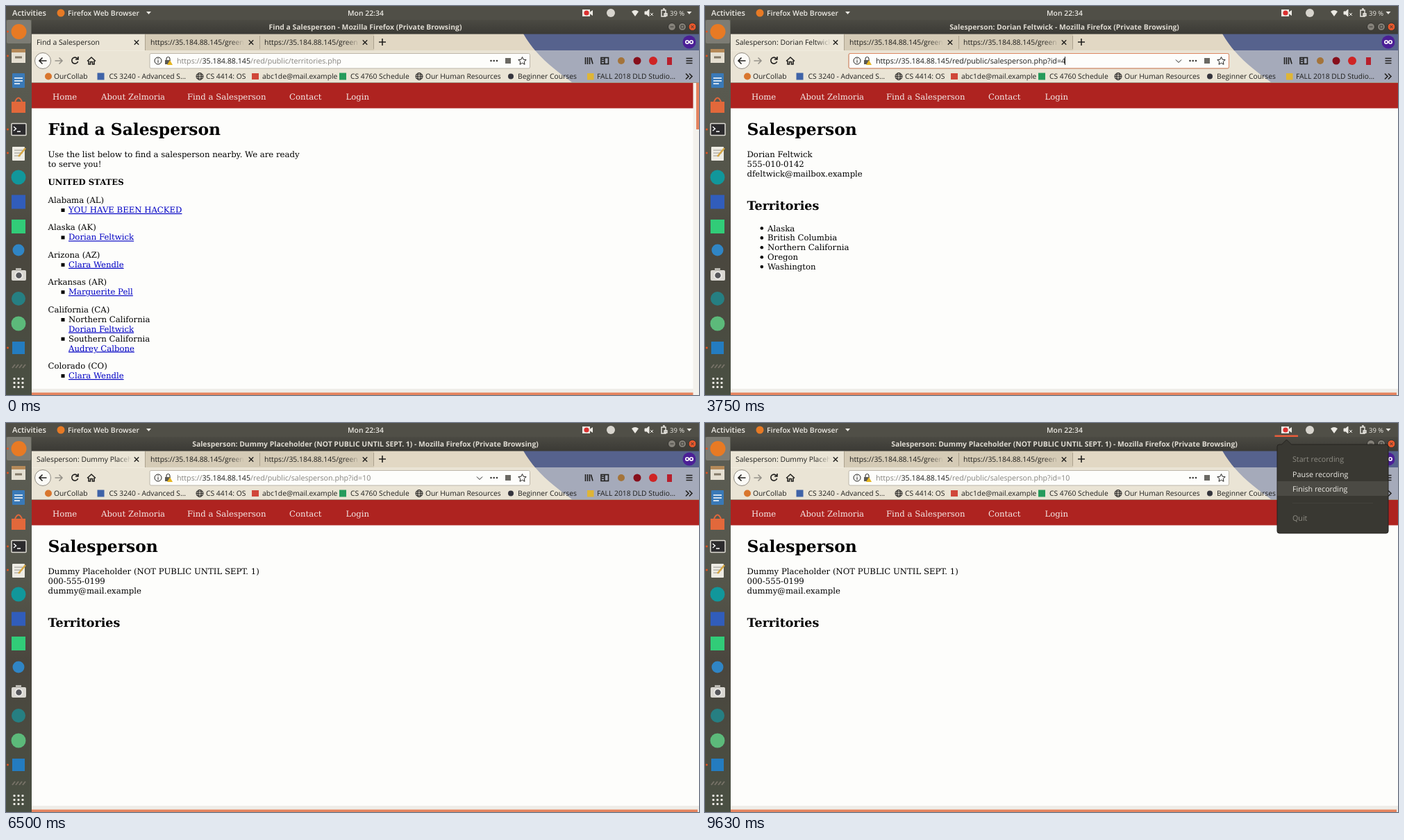
An HTML page that plays this animation: 998x561 px, repeating every 9760 ms.

```html
<!DOCTYPE html>
<html lang="en">
<head>
<meta charset="utf-8">
<title>Browser recording</title>
<style>
html, body { margin: 0; width: 100%; height: 100%; overflow: hidden; background: #fdfdfb; }
#stage { display: block; width: 998px; height: 561px; }
text { white-space: pre; text-rendering: geometricPrecision; }
.ui { font: 10.7px "Open Sans", "Noto Sans", sans-serif; fill: #1d1d1b; }
.panel { font-weight: 600; font-size: 10.4px; fill: #eceae4; }
.title { font-weight: 700; font-size: 10.4px; fill: #dfdbd2; text-anchor: middle; }
.tab { font-size: 10.4px; }
.mark { font-size: 10.3px; }
.grey { fill: #85837e; }
.host { fill: #1d1d1b; }
.page { font: 11.69px "DejaVu Serif", serif; fill: #000; }
.h1 { font-size: 23.4px; font-weight: 700; }
.h2 { font-size: 17.5px; font-weight: 700; }
.bold { font-weight: 700; }
.link { fill: #0000c4; text-decoration: underline; }
.nav { fill: #f4e8e6; }
.line { fill: none; stroke: #22211f; stroke-width: 1.6; }
.thin { stroke-width: 1; }
</style>
</head>
<body>
<svg id="stage" viewBox="0 0 998 561">
<defs>
  <linearGradient id="dock" x2="0" y2="1">
    <stop offset="0" stop-color="#5d5e55"/><stop offset=".4" stop-color="#54554a"/>
    <stop offset=".6" stop-color="#4a463e"/><stop offset="1" stop-color="#4a5043"/>
  </linearGradient>
  <linearGradient id="bar" x2="0" y2="1"><stop offset="0" stop-color="#4b4a43"/><stop offset="1" stop-color="#3b3a35"/></linearGradient>
  <linearGradient id="fadeOn"><stop offset="0" stop-color="#ebe5d6" stop-opacity="0"/><stop offset="1" stop-color="#ebe5d6"/></linearGradient>
  <linearGradient id="fadeOff"><stop offset="0" stop-color="#d5cbb6" stop-opacity="0"/><stop offset="1" stop-color="#d5cbb6"/></linearGradient>
  <linearGradient id="shade" x2="0" y2="1"><stop offset="0" stop-color="#000" stop-opacity=".22"/><stop offset="1" stop-color="#000" stop-opacity="0"/></linearGradient>
  <g id="globe" class="line thin"><circle r="5"/><ellipse rx="2.3" ry="5"/><path d="M-5 0H5M-4.3-2.5H4.3M-4.3 2.5H4.3"/></g>
  <path id="close" class="line thin" d="M-3.2-3.2 3.2 3.2M3.2-3.2-3.2 3.2" style="stroke-width:1.4"/>
</defs>

<!-- page -->
<rect width="998" height="561" fill="#fdfdfb"/>
<rect x="37" y="110" width="961" height="37.5" fill="#ae2320"/>
<g class="page nav">
  <text x="67" y="134.5">Home</text><text x="137" y="134.5">About Zelmoria</text>
  <text x="261" y="134.5">Find a Salesperson</text><text x="408" y="134.5">Contact</text><text x="489.5" y="134.5">Login</text>
</g>
<rect x="37" y="552" width="961" height="9" fill="#efede8"/>
<rect x="37" y="557.5" width="959" height="4" fill="#e5835e"/>

<g class="page" data-on="0-2500">
  <text class="h1" x="60.5" y="185.5">Find a Salesperson</text>
  <text x="60.5" y="218">Use the list below to find a salesperson nearby. We are ready</text>
  <text x="60.5" y="232">to serve you!</text>
  <text class="bold" x="60.5" y="258">UNITED STATES</text>
  <g id="territories"></g>
  <rect x="89.5" y="326.5" width="99" height="14" fill="none" stroke="#8a86a6" data-on="1880-2500"/>
  <rect x="989.5" y="110" width="8.5" height="451" fill="#f3f1ec"/>
  <rect x="994" y="111" width="4" height="67" fill="#e5835e"/>
</g>

<g class="page" data-on="2500-9760">
  <text class="h1" x="60.5" y="185.5">Salesperson</text>
  <text class="h2" x="60.5" y="294">Territories</text>
</g>
<g class="page" data-on="2500-6250">
  <text x="60.5" y="218">Dorian Feltwick</text>
  <text x="60.5" y="232">555-010-0142</text>
  <text x="60.5" y="246">dfeltwick@mailbox.example</text>
  <g id="regions"></g>
</g>
<g class="page" data-on="6250-9760">
  <text x="60.5" y="218">Dummy Placeholder (NOT PUBLIC UNTIL SEPT. 1)</text>
  <text x="60.5" y="232">000-555-0199</text>
  <text x="60.5" y="246">dummy@mail.example</text>
</g>

<!-- status bar -->
<g class="ui" data-on="880-2000">
  <rect x="36.5" y="545.5" width="279" height="17" rx="2" fill="#eceae1" stroke="#c2bfb4"/>
  <text x="40" y="557">https://35.184.88.145/red/public/salesperson.php?id=4</text>
</g>
<g class="ui" data-on="2000-2630 6000-6250">
  <rect x="36.5" y="545.5" width="236" height="17" rx="2" fill="#eceae1" stroke="#c2bfb4"/>
  <text x="40" y="557" fill="#4a4944">Waiting for 35.184.88.145…</text>
</g>

<!-- browser frame -->
<rect x="37" y="40" width="961" height="70.5" fill="#e2d8c4"/>
<path d="M745 40H998V110H815C795 95 765 75 745 40Z" fill="#56628d"/>
<rect x="200" y="40" width="330" height="24" fill="#d5cbb6"/>
<rect x="37" y="40" width="163" height="25" fill="#ebe5d6"/>
<rect x="37" y="64" width="961" height="46.5" fill="#f4f1e8" opacity=".5"/>
<path d="M200.5 41V64M365.5 43V62M529.5 43V62" stroke="#aca28e"/>
<path d="M37 110.5H998" stroke="#a39a88"/>

<g class="ui tab">
  <svg x="44" y="40" width="136" height="24">
    <text y="16" data-on="0-2000">Find a Salesperson</text>
    <text x="16" y="16" data-on="2000-2750 6000-6380">35.184.88.145/red/public</text>
    <text y="16" data-on="2750-6000">Salesperson: Dorian Feltwick</text>
    <text y="16" data-on="6380-9760">Salesperson: Dummy Placeholder</text>
  </svg>
  <rect x="160" y="42" width="21" height="20" fill="url(#fadeOn)"/>
  <svg x="208" y="40" width="134" height="24"><text y="16">https://35.184.88.145/green</text></svg>
  <rect x="322" y="42" width="21" height="20" fill="url(#fadeOff)"/>
  <svg x="372" y="40" width="136" height="24"><text y="16">https://35.184.88.145/green</text></svg>
  <rect x="488" y="42" width="21" height="20" fill="url(#fadeOff)"/>
</g>
<circle id="spinner" cy="52" r="1.5" fill="#55534d" data-on="2000-2750 6000-6380"/>
<use href="#close" x="188" y="52.5"/><use href="#close" x="353" y="52.5"/><use href="#close" x="517" y="52.5"/>
<path class="line" d="M537 52H547M542 47V57"/>
<circle cx="984" cy="52" r="9.5" fill="#4b1f96"/>
<g fill="none" stroke="#fff" stroke-width="1.6"><circle cx="981" cy="52" r="2.2"/><circle cx="987" cy="52" r="2.2"/></g>

<!-- toolbar -->
<circle cx="53" cy="79" r="11.5" fill="#fbfaf6" stroke="#8f8a80"/>
<path class="line" d="M58.5 79H48M52.5 74.5 48 79 52.5 83.5"/>
<path class="line" style="stroke:#96928a" d="M70.5 79H81M76.5 74.5 81 79 76.5 83.5"/>
<g class="line">
  <path data-on="0-2000 3130-6000 6500-9760" d="M103 76A4.5 4.5 0 1 0 103.6 80M104 73V77H100"/>
  <path data-on="2000-2130 2250-2880 6000-6500" d="M95 75 103 83M103 75 95 83"/>
  <path data-on="2130-2250 2880-3130" d="M94.5 74 103.5 83"/>
  <path d="M117 79.5 123 74 129 79.5M119 79V84H121.5V80.5H124.5V84H127V79"/>
</g>
<rect x="207" y="68.5" width="547.5" height="21.5" rx="2" fill="#fdfdfb" stroke="#bdb7aa"/>
<rect x="207" y="68.5" width="547.5" height="21.5" rx="2" fill="none" stroke="#dd8762" data-on="3500-6000"/>

<g data-on="0-4380 6000-9760">
  <circle class="line thin" cx="219" cy="79" r="5"/><path class="line thin" d="M219 78V82M219 75.5V76.8"/>
  <path class="line thin" d="M231 79V76A2.5 2.5 0 0 1 236 76V79"/>
  <rect x="229" y="78" width="8" height="6" fill="#5b5953"/><path d="M236 78 240 85H232Z" fill="#e5b520"/>
  <g fill="#3a3936"><circle cx="698.5" cy="79" r="1.3"/><circle cx="702.7" cy="79" r="1.3"/><circle cx="707" cy="79" r="1.3"/></g>
  <rect x="719" y="75" width="8" height="8" fill="#6b6963"/>
  <path class="line thin" d="M743.5 73.5 745.2 77.2 749.2 77.6 746.2 80.3 747 84.3 743.5 82.2 740 84.3 740.8 80.3 737.8 77.6 741.8 77.2Z"/>
  <path class="line thin" d="M678 77.5 682 81.5 686 77.5" data-on="3500-4380 6000-7750" data-key="0:1 7380:.75 7500:.5 7630:.25"/>
</g>
<g class="ui grey">
  <text x="246" y="83" data-on="0-2000">https://<tspan class="host">35.184.88.145</tspan>/red/public/territories.php</text>
  <text x="246" y="83" data-on="2000-3500">https://<tspan class="host">35.184.88.145</tspan>/red/public/salesperson.php?id=4</text>
  <text x="246" y="83" data-on="3500-4380" class="host">https://35.184.88.145/red/public/salesperson.php?id=4</text>
  <text x="246" y="83" data-on="6000-9760">https://<tspan class="host">35.184.88.145</tspan>/red/public/salesperson.php?id=10</text>
</g>
<path class="line thin" d="M518.5 73V85" data-on="3750-4380"/>

<g class="line">
  <path d="M834.5 74V84M837.5 74V84M840.5 74V84M842.5 74.5 845 83.5"/>
  <rect x="857" y="74.5" width="10.5" height="9"/><path d="M862 74.5V83.5M858 77H861M858 80H861"/>
  <path d="M979.5 75.5H988.5M979.5 79H988.5M979.5 82.5H988.5"/>
</g>
<circle cx="886" cy="79" r="5" fill="#a4743a"/><circle cx="909" cy="79" r="5.5" fill="#870f1b"/>
<circle cx="932" cy="79" r="6" fill="#cf2424"/><rect x="952" y="74" width="7" height="11" fill="#b81f2c"/>

<!-- bookmarks -->
<g class="ui mark">
  <circle cx="61" cy="101.5" r="5" fill="#d9762d"/><text x="69" y="105">OurCollab</text>
  <rect x="131.5" y="96.5" width="10" height="10" fill="#3f63a8"/><text x="148.5" y="105">CS 3240 - Advanced S…</text>
  <use href="#globe" x="279" y="101.5"/><text x="288" y="105">CS 4414: OS</text>
  <rect x="354" y="97" width="10" height="9" fill="#d0473a"/><text x="369" y="105">abc1de@mail.example</text>
  <rect x="480" y="96.5" width="10" height="10" fill="#259b5b"/><text x="496" y="105">CS 4760 Schedule</text>
  <use href="#globe" x="595" y="101.5"/><text x="604" y="105">Our Human Resources</text>
  <circle cx="727" cy="101.5" r="4" fill="#34343c"/><text x="737" y="105">Beginner Courses</text>
  <rect x="837" y="97" width="9.5" height="9.5" fill="#dfb536"/><text x="851" y="105">FALL 2018 DLD Studio…</text>
  <path class="line" d="M979 97.5 983 101.5 979 105.5M984 97.5 988 101.5 984 105.5"/>
</g>

<!-- address suggestions -->
<g class="ui" data-on="4380-6000">
  <rect x="37" y="168" width="961" height="10" fill="url(#shade)"/>
  <rect x="37" y="94" width="961" height="74" fill="#f8f7f4"/>
  <rect x="41" y="97.5" width="954" height="22.5" rx="1" fill="#e47d57"/>
  <rect x="37" y="123.5" width="961" height="21.5" fill="#f0efec"/>
  <path d="M37 123.5H998M37 145H998M74.5 149V164M111 149V164M147.5 149V164M184 149V164M220.5 149V164M257 149V164M961 147V167" stroke="#d3d1cc"/>
  <g class="line" style="stroke:#85837e"><circle cx="218" cy="77.5" r="3.7"/><path d="M220.8 80.3 224.5 84"/></g>
  <path class="line thin" d="M737.5 79H749M744.5 74.5 749 79 744.5 83.5"/>
  <use href="#globe" x="221" y="109" style="filter:invert(1)"/>
  <text x="231" y="83">https://35.184.88.145/red/public/salesperson.php?id=<tspan class="typed"></tspan></text>
  <text x="233" y="113" fill="#fff" class="bold">https://35.184.88.145/red/public/salesperson.php?id=<tspan class="typed"></tspan><tspan dx="5" font-weight="400" font-size="9.8">— Visit</tspan></text>
  <text x="42" y="138" class="grey" style="font-size:10.5px">Search for <tspan class="host">https://35.184.88.145/red/public/salesperson.php?id=<tspan class="typed"></tspan></tspan> with:</text>
  <circle cx="56" cy="156" r="4.5" fill="#4285d8"/><rect x="87.5" y="151" width="11" height="11" fill="#16866f"/>
  <circle cx="129" cy="156" r="4.5" fill="#2b2925"/><circle cx="166" cy="156" r="5.5" fill="#d64c2c"/>
  <rect x="198" y="152" width="8" height="8" fill="#d9b94c"/><circle cx="239" cy="156" r="5" fill="#35aee0"/><rect x="271" y="152" width="8" height="8" fill="#333"/>
  <circle class="line" cx="979" cy="156" r="3.5" style="stroke:#75736e"/>
  <circle cx="979" cy="156" r="5" fill="none" stroke="#75736e" stroke-width="2" stroke-dasharray="1.96"/>
</g>

<!-- desktop -->
<rect width="998" height="20" fill="#504f47"/>
<rect x="37" y="20" width="961" height="20.5" fill="url(#bar)"/>
<g class="ui title">
  <text x="517.5" y="33.5" data-on="0-2000">Find a Salesperson - Mozilla Firefox (Private Browsing)</text>
  <text x="517.5" y="33.5" data-on="2000-2880 6130-6380">Mozilla Firefox (Private Browsing)</text>
  <text x="517.5" y="33.5" data-on="2880-6130">Salesperson: Dorian Feltwick - Mozilla Firefox (Private Browsing)</text>
  <text x="517.5" y="33.5" data-on="6380-9760">Salesperson: Dummy Placeholder (NOT PUBLIC UNTIL SEPT. 1) - Mozilla Firefox (Private Browsing)</text>
</g>
<g stroke="#32312d" fill="#85827a"><circle cx="959" cy="30" r="5.5"/><circle cx="974" cy="30" r="5.5"/><circle cx="988.5" cy="30" r="5.5" fill="#e9582c"/></g>
<path d="M956.5 30H961.5M972 28H976V32H972ZM986.5 28 990.5 32M990.5 28 986.5 32" fill="none" stroke="#3a3935"/>

<g class="ui panel">
  <text x="9" y="13.5" style="font-size:11.2px">Activities</text>
  <circle cx="79" cy="10" r="5.5" fill="#e77a25"/><text x="89" y="13.5">Firefox Web Browser</text><path d="M202 8H209L205.5 12Z"/>
  <text x="492" y="13.5">Mon 22:34</text>
  <path d="M830 5H841V8.5L845 6V14L841 11.5V15H830Z"/><circle cx="836" cy="10" r="3.6" fill="#dc3030"/>
  <circle cx="871" cy="10" r="6" fill="#d8d5ce"/>
  <path d="M906 15 901 8Q906 4 911 8Z"/>
  <path d="M920 8H922.5L926 5V15L922.5 12H920ZM928 10 932 14M932 10 928 14" stroke="#eceae4"/>
  <path d="M944 6H950V15H944ZM946 4H948V6M948 11H952V14H948Z" fill="none" stroke="#eceae4" stroke-width="1.4"/>
  <text x="956" y="13.5" style="font-size:9.5px;font-weight:400">39 %</text><path d="M980.5 8H987.5L984 12Z"/>
</g>

<!-- dock -->
<rect y="20" width="37" height="541" fill="url(#dock)"/>
<rect x="1" y="20" width="35" height="34" rx="2" fill="#7d7c74"/>
<g id="running" fill="#e95420"></g>
<circle cx="18.5" cy="37" r="11" fill="#e87a24"/>
<path d="M8 62H28V82H8Z" fill="#e5dfd1"/><path d="M8 62H28V67H8Z" fill="#b58a59"/><path d="M13 74H23" stroke="#847a69" stroke-width="3"/>
<rect x="9" y="97" width="18" height="21" rx="1" fill="#3a79b7"/><path d="M12 104H24M12 108H24M12 112H20" stroke="#fff" stroke-width="1.5"/>
<path d="M8 138H28V154H8Z" fill="#e2683b"/><path d="M13 138Q18 127 23 138" fill="none" stroke="#e2683b" stroke-width="2"/>
<rect x="8" y="169.5" width="21" height="17" rx="1" fill="#2c2b2d" stroke="#dedbd4" stroke-width="1.5"/><path d="M11 174 14.5 177 11 180M16 181H21" fill="none" stroke="#fff" stroke-width="1.4"/>
<rect x="9" y="203" width="18" height="20" rx="1" fill="#eeece4"/><path d="M12 208H24M12 212H24M12 216H21" stroke="#96948d"/><path d="M18 217 28 205" stroke="#d5a642" stroke-width="2.5"/>
<circle cx="18" cy="247" r="10.5" fill="#11979b"/>
<rect x="8" y="272.5" width="20" height="20" fill="#315dbb"/>
<rect x="8" y="308" width="20" height="20" fill="#31cc78"/>
<circle cx="18" cy="352" r="8.5" fill="#3085c5"/>
<rect x="8" y="381" width="21" height="15" rx="2" fill="#d9d7d1"/><rect x="14" y="378" width="8" height="4" fill="#b9b7b0"/><circle cx="18.5" cy="388.5" r="5" fill="#56575b" stroke="#f3f2ee" stroke-width="1.5"/>
<circle cx="18" cy="422" r="10" fill="#267f82"/>
<circle cx="18" cy="458" r="10.5" fill="#5cba7a"/>
<rect x="9" y="484" width="18" height="18" fill="#247cc0"/>
<path d="M9 522 13 517M14 522 18 517M19 522 23 517M24 522 28 517" stroke="#777267" stroke-width="2"/>
<g id="apps" fill="#eeece5"></g>

<!-- recorder menu -->
<g class="ui" data-key="0:0 8000:.35 8130:.7 8250:1">
  <rect x="820.5" y="17.5" width="33.5" height="2.5" fill="#e95d3b"/>
  <path d="M827 31H830.5L837.5 24 844.5 31H981Q984 31 984 34V156Q984 159 981 159H827Q824 159 824 156V34Q824 31 827 31Z" fill="#393832" stroke="#24231f"/>
  <rect x="824.5" y="84" width="159" height="21" fill="#4b4a44" data-key="0:0 9500:.5 9630:1"/>
  <path d="M846 115.5H962" stroke="#42413b"/>
  <g fill="#eeece6"><text x="846" y="77.5">Pause recording</text><text x="846" y="98.5">Finish recording</text></g>
  <g fill="#8e8c84"><text x="846" y="56">Start recording</text><text x="846" y="141">Quit</text></g>
</g>
</svg>
<script>
const LOOP = 9760;
const $ = id => document.getElementById(id);
const label = (x, y, text, cls = '') => `<text x="${x}" y="${y}" class="${cls}">${text}</text>`;
const square = y => `<rect x="79.5" y="${y - 6}" width="5" height="5"/>`;
const entry = (y, name) => square(y) + label(90, y, name, 'link');

const people = ['YOU HAVE BEEN HACKED', 'Dorian Feltwick', 'Clara Wendle', 'Marguerite Pell'];
const states = ['Alabama (AL)', 'Alaska (AK)', 'Arizona (AZ)', 'Arkansas (AR)'];
$('territories').innerHTML = states.map((state, i) => {
  const y = 284 + i * 39.4;
  return label(60.5, y, state) + entry(y + 14, people[i]);
}).join('') +
  label(60.5, 442, 'California (CA)') +
  square(456) + label(90, 456, 'Northern California') + label(90, 469.7, people[1], 'link') +
  square(483.7) + label(90, 483.7, 'Southern California') + label(90, 497.5, 'Audrey Calbone', 'link') +
  label(60.5, 523, 'Colorado (CO)') + entry(537, people[2]);

$('regions').innerHTML = ['Alaska', 'British Columbia', 'Northern California', 'Oregon', 'Washington']
  .map((name, i) => `<circle cx="81.8" cy="${320.5 + i * 13.9}" r="2.3"/>` + label(90, 324.5 + i * 13.9, name)).join('');

$('running').innerHTML = [37, 72, 178, 212, 493].map(y => `<circle cx="2.5" cy="${y}" r="1.4"/>`).join('');
$('apps').innerHTML = Array.from({ length: 9 }, (_, i) =>
  `<rect x="${10.5 + i % 3 * 6}" y="${536 + Math.floor(i / 3) * 6}" width="3" height="3" rx=".8"/>`).join('');

const spans = [...document.querySelectorAll('[data-on]')].map(el =>
  ({ el, ranges: el.dataset.on.split(' ').map(r => r.split('-').map(Number)) }));
const fades = [...document.querySelectorAll('[data-key]')].map(el =>
  ({ el, keys: el.dataset.key.split(' ').map(k => k.split(':').map(Number)) }));
const typed = [...document.querySelectorAll('.typed')];

function draw(t) {
  for (const { el, ranges } of spans)
    el.style.display = ranges.some(([from, to]) => t >= from && t < to) ? '' : 'none';
  for (const { el, keys } of fades)
    el.style.opacity = keys.filter(([at]) => at <= t).pop()[1];
  const digits = t < 4880 ? '' : t < 5130 ? '1' : '10';
  for (const el of typed) el.textContent = digits;
  $('spinner').setAttribute('cx', 49 + 5 * Math.sin(t / 160));
}

function tick() {
  draw(performance.now() % LOOP);
  requestAnimationFrame(tick);
}
tick();
</script>
</body>
</html>
```
